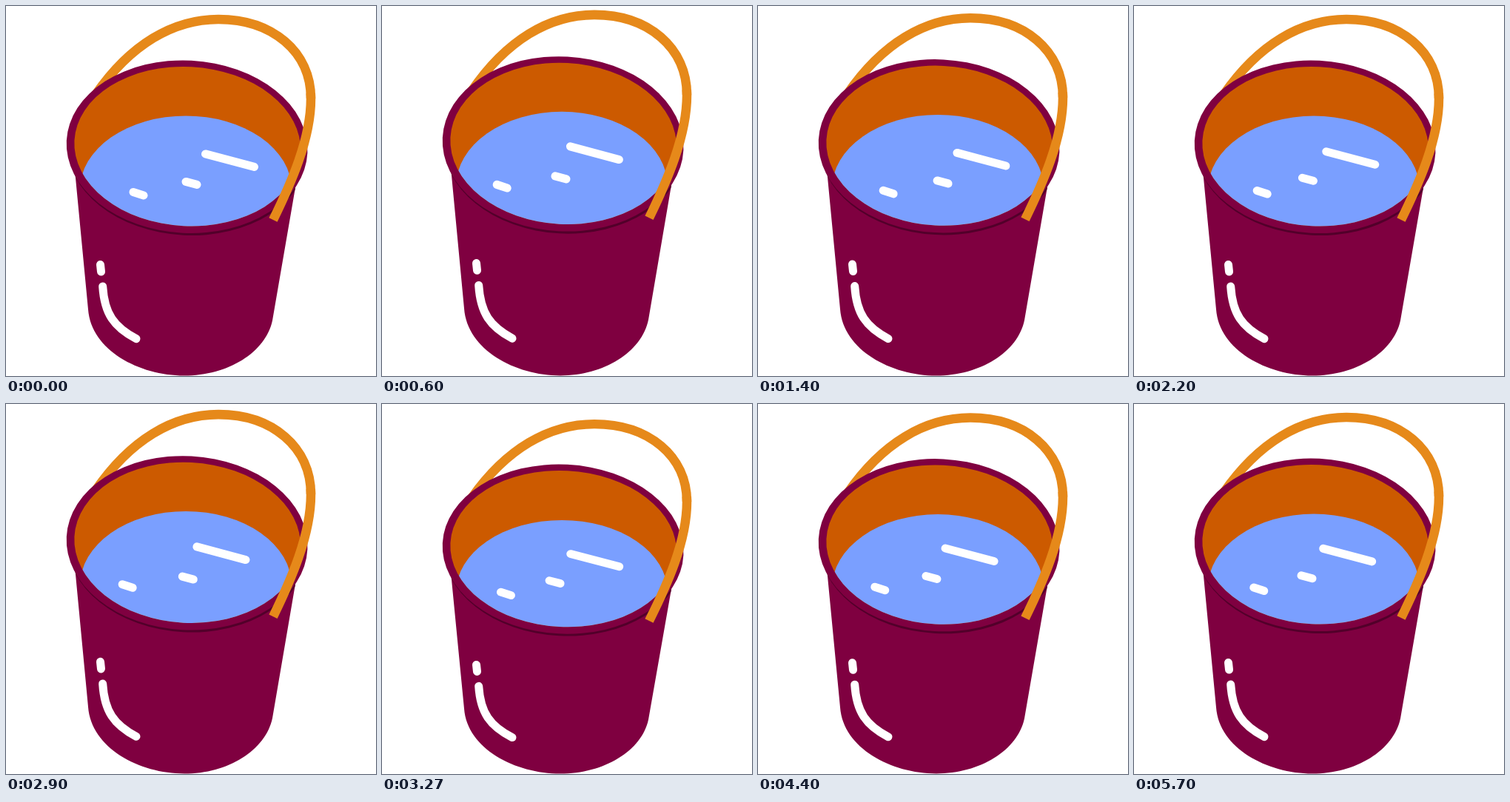
Recreate the animation shown at these times as an HTML page. Size 500 px wide and 500 px high, loop 5730 ms.

```html
<!DOCTYPE html>
<html lang="en">
<head>
<meta charset="utf-8">
<title>Bucket</title>
<style>
  html, body { margin: 0; width: 100%; height: 100%; overflow: hidden; background: #fff; }
  svg { display: block; width: 100%; height: 100%; }
  .line { fill: none; stroke: #fff; stroke-width: 11; stroke-linecap: round; }
  .handle { fill: none; stroke: #e6891a; stroke-width: 12.5; }
</style>
</head>
<body>
<svg viewBox="0 0 500 500">
  <defs>
    <path id="body" d="M93 222L111 410C115 465 180 499.5 241 499.5C300 499.5 351 468 360 425L394 228Z"/>
    <ellipse id="inner" cx="245.2" cy="189.8" rx="153" ry="107.6" transform="rotate(3 245.2 189.8)"/>
    <clipPath id="inBody"><use href="#body"/></clipPath>
    <clipPath id="inRim"><use href="#inner"/></clipPath>
  </defs>
  <g id="bucket">
    <path class="handle" d="M112 133L121 120C168 52 226 18 287 18C360 18 412 62 412 125"/>
    <use href="#body" fill="#7f0040"/>
    <g clip-path="url(#inBody)">
      <ellipse cx="245.5" cy="193.6" rx="162.5" ry="116.3" transform="rotate(3 245.5 193.6)" fill="#52002a"/>
    </g>
    <ellipse cx="244.6" cy="190.3" rx="163" ry="116.6" transform="rotate(3 244.6 190.3)" fill="#7f0040"/>
    <use href="#inner" fill="#cc5a00"/>
    <g clip-path="url(#inRim)">
      <g id="water">
        <path d="M100 248A143 99.5 0 0 1 386 248V320H100Z" fill="#7a9fff"/>
        <path class="line glint" d="M269.5 200L335.5 217.5"/>
        <path class="line glint" d="M243 237.5L258 241.5"/>
        <path class="line glint" d="M172 251.5L186 256"/>
      </g>
    </g>
    <path class="line" d="M127.5 349.5L128.5 359M130.7 379C133 416 146 434 176 449.7"/>
    <path class="handle" d="M411.8 118Q412 121 412 125C412 180 385 240 361 289"/>
  </g>
</svg>
<script>
  const LOOP = 5730, BEAT = 200, SWING = 1200;
  // Stretch of the bucket in pixels at its top, one extreme per beat.
  const bounce = [0, 14, -9.2, 6.2, -4.5, 3.2, -2.4, 1.7, -1.3, 0];
  const delays = [130, 290, 40];
  const bucket = document.getElementById('bucket');
  const water = document.getElementById('water');
  const glints = document.querySelectorAll('.glint');

  function stretch(t) {
    const i = Math.floor(t / BEAT), u = t / BEAT - i;
    if (i >= bounce.length - 1) return 0;
    const k = i ? (1 - Math.cos(Math.PI * u)) / 2 : Math.sin(Math.PI * u / 2);
    return bounce[i] + (bounce[i + 1] - bounce[i]) * k;
  }

  function draw(now) {
    const t = now % LOOP;
    const rise = stretch(t % (LOOP / 2));
    const s = 1 + rise / 488;
    bucket.setAttribute('transform', `matrix(1 0 0 ${s} 0 ${500 * (1 - s)})`);
    water.setAttribute('transform', `translate(0 ${-0.2 * rise})`);
    glints.forEach((glint, i) => {
      const k = (1 - Math.cos(2 * Math.PI * Math.max(0, t - delays[i]) / SWING)) / 2;
      glint.setAttribute('transform', `translate(${-17 * k} ${-5.7 * k})`);
    });
  }

  const start = performance.now();
  function tick() {
    draw(performance.now() - start);
    requestAnimationFrame(tick);
  }
  tick();
</script>
</body>
</html>
```
